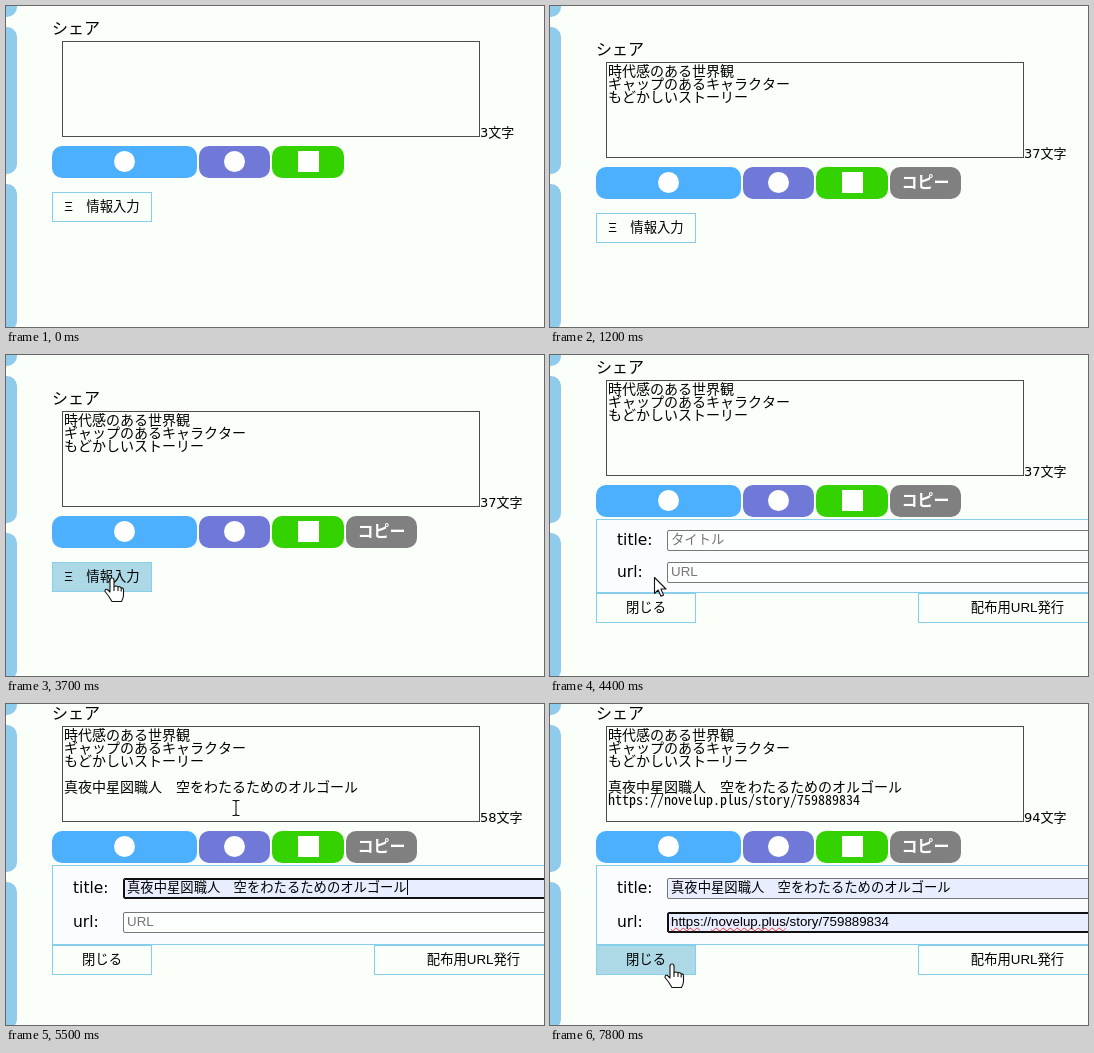
Recreate the animation shown at these times as an HTML page. Size 538 by 321 pixels, loop 8000 ms.

```html
<!DOCTYPE html>
<html lang="ja">
<head>
<meta charset="utf-8">
<title>シェア</title>
<style>
  html, body { margin: 0; width: 100%; height: 100%; overflow: hidden; background: #fafff9; }
  #stage { position: relative; width: 538px; height: 321px; overflow: hidden; background: #fafff9;
    color: #000; font: 13.333px "Liberation Sans", "Noto Sans CJK JP", sans-serif; }
  #stage div, #cursor { position: absolute; box-sizing: border-box; white-space: pre; }
  .bar { left: -20px; width: 31px; height: 147px; border-radius: 10px; background: #91cbec; }
  #flow { left: 0; top: 0; }
  .ui { font-family: "DejaVu Sans", "Noto Sans CJK JP", sans-serif; }
  #heading { left: 46px; top: -24px; font-size: 16px; line-height: 24px; }
  #area { left: 56px; top: 0; width: 418px; height: 96px; padding: 1px 1px; border: 1px solid #4c4c4c;
    font: 14px/13px "Noto Sans Mono CJK JP", "Noto Sans CJK JP", monospace; }
  #count { left: 474px; top: 82px; font-size: 13px; line-height: 20px; }
  .share { top: 105px; width: 71px; height: 32px; border-radius: 10px; }
  .mark { left: 50%; top: 5px; width: 21px; height: 21px; margin-left: -10.5px; background: #fff; }
  .round { border-radius: 50%; }
  #copy { background: #808080; color: #fff; text-align: center;
    font: bold 16px/29px "Noto Sans CJK JP", sans-serif; }
  .btn { width: 100px; height: 30px; border: 1px solid #87ceeb; line-height: 28px; text-align: center; }
  .btn.hover { background: #add8e6; }
  #open { left: 46px; top: 151px; }
  #panel { left: 46px; top: 139px; width: 521px; overflow: hidden;
    border: 1px solid #87ceeb; background: #fafcff; }
  .row { left: 0; width: 521px; height: 21px; }
  .label { left: 20px; top: 0; font-size: 15.5px; line-height: 21px; }
  .field { left: 70px; top: 0; width: 440px; height: 21px; padding-left: 3px; line-height: 18px;
    border: 1px solid #767676; border-radius: 2px; background: #fdfffe; }
  .field.filled { background: #e8edff; }
  .field.focus { border-color: #101010; box-shadow: inset 0 0 0 1px #101010; }
  .field.empty .text { color: #757575; }
  .caret { display: inline-block; width: 1px; height: 15px; margin-right: -1px;
    vertical-align: -3px; background: #000; }
  .typo { text-decoration: underline wavy #e33 1px; text-decoration-skip-ink: none; }
  #cursor { left: 0; top: 0; overflow: visible; }
  #cursor path { stroke: #111; stroke-width: 1.1; fill: #fff; stroke-linejoin: round; }
  #cursor #beam { fill: none; }
</style>
</head>
<body>
<div id="stage">
  <div class="bar" style="top:-136px"></div>
  <div class="bar" style="top:21px"></div>
  <div class="bar" style="top:178px"></div>

  <div id="flow">
    <div id="heading" class="ui">シェア</div>
    <div id="area"></div>
    <div id="count" class="ui"></div>
    <div class="share" style="left:46px;width:145px;background:#4cb0ff"><div class="mark round"></div></div>
    <div class="share" style="left:193px;background:#7078d8"><div class="mark round"></div></div>
    <div class="share" style="left:266px;width:72px;background:#33d200"><div class="mark"></div></div>
    <div class="share" id="copy" style="left:340px">コピー</div>
    <div class="btn" id="open">Ξ　情報入力</div>
    <div id="panel">
      <div class="row" id="titleRow"><div class="label ui">title:</div><div class="field" id="title"></div></div>
      <div class="row" id="urlRow"><div class="label ui">url:</div><div class="field" id="url"></div></div>
    </div>
    <div class="btn" id="close" style="left:46px">閉じる</div>
    <div class="btn" id="issue" style="left:368px;width:199px">配布用URL発行</div>
  </div>

  <svg id="cursor" width="1" height="1">
    <path id="arrow" d="M.5 .5V16.5L4.2 13L7 19.3L9.6 18.1L6.9 12H12Z"/>
    <path id="hand" d="M-2 14V2a2 2 0 0 1 4 0V9q2-2 4 0 2-1 3.2 1 2.3-.5 2.3 2V17q0 3-2 6.500H0Q-3 18-7 13.500q0-3 2.500-2Z M2 9v4M6 9.500v3.500M9.200 10.500v3"/>
    <path id="beam" d="M-3.500-7.500H-1L0-6.500L1-7.500H3.500M0-6.500V6.500M-3.500 7.500H-1L0 6.500L1 7.500H3.500"/>
  </svg>
</div>

<script>
const LOOP = 8000;
const INTRO = "時代感のある世界観\nギャップのあるキャラクター\nもどかしいストーリー";
const TITLE = "真夜中星図職人　空をわたるためのオルゴール";
const URL_TEXT = "https://novelup.plus/story/759889834";
const URL_HTML = URL_TEXT.replace(/https|novelup\.plus/g, '<span class="typo">$&</span>');

// Pointer stops: time, x, y, shape
const stops = [
  [2900, -9, 10, "arrow"], [3200, 62, 42, "arrow"], [3300, 142, 98, "arrow"], [3400, 184, 154, "arrow"],
  [3500, 172, 202, "arrow"], [3600, 128, 220, "hand"], [3700, 106, 223, "hand"], [4300, 104, 222, "arrow"],
  [4700, 116, 216, "arrow"], [4800, 140, 204, "arrow"], [4900, 166, 190, "beam"], [5000, 186, 185, "beam"],
  [5100, 197, 204, "arrow"], [5200, 214, 218, "arrow"], [5500, 230, 104, "beam"],
  [5600, 224, 146, "hand"], [5700, 215, 196, "arrow"], [5800, 205, 218, "beam"], [6300, 215, 71, "beam"],
  [6400, 176, 108, "beam"], [6500, 122, 152, "hand"], [6600, 62, 198, "arrow"], [6700, 24, 234, "arrow"],
  [6800, 8, 258, "arrow"], [6900, 42, 263, "arrow"], [7000, 88, 261, "hand"], [7100, 122, 260, "hand"]
];

const $ = id => document.getElementById(id);
const show = (id, on) => { $(id).style.display = on ? "" : "none"; };
const within = (t, a, b) => t >= a && t < b;

function setHtml(el, html) {
  if (el.shown !== html) el.innerHTML = el.shown = html;
}

function drawField(id, hint, value, focus, caret) {
  const el = $(id);
  el.className = "field" + (value ? " filled" : " empty") + (focus ? " focus" : "");
  const bar = caret ? '<span class="caret"></span>' : "";
  const text = `<span class="text">${value || hint}</span>`;
  setHtml(el, value ? text + bar : bar + text);
}

function drawLayout(t) {
  const open = t < 4300 ? 0 : t < 4400 ? 0.5 : t < 4500 ? 0.92 : 1;
  const y = t < 1200 ? 35 : Math.round(56 - 34 * open);
  const height = Math.round(80 * open);
  const spread = Math.round(5 + 12 * open);
  const middle = height / 2 - 11.5;
  $("flow").style.transform = `translateY(${y}px)`;
  $("panel").style.height = height + "px";
  $("titleRow").style.top = Math.round(middle - spread) + "px";
  $("urlRow").style.top = Math.round(middle + spread) + "px";
  $("close").style.top = $("issue").style.top = 139 + height + "px";
  for (const id of ["panel", "close", "issue"]) show(id, open > 0);
  show("open", !open);
  show("copy", t >= 1200);
  $("open").classList.toggle("hover", t >= 3600);
  $("close").classList.toggle("hover", t >= 7000);
}

function drawText(t) {
  let text = t < 1200 ? "" : INTRO;
  if (t >= 5500) text += "\n\n" + TITLE;
  if (t >= 6200) text += "\n" + URL_TEXT;
  setHtml($("area"), text);
  setHtml($("count"), (t < 1200 ? 3 : t < 5500 ? 37 : t < 6200 ? 58 : 94) + "文字");

  drawField("title", "タイトル", t >= 5300 ? TITLE : "", within(t, 5000, 5800), within(t, 5000, 5800));
  const blink = within(t, 5800, 6300) || within(t, 6400, 6800) || within(t, 7300, 7800);
  drawField("url", "URL", t >= 6000 ? URL_HTML : "", t >= 5800, blink);
}

function drawCursor(t) {
  const stop = stops.filter(s => s[0] <= t).pop();
  show("cursor", stop);
  if (!stop) return;
  const [, x, y, shape] = stop;
  $("cursor").style.transform = `translate(${x}px, ${y}px)`;
  for (const id of ["arrow", "hand", "beam"]) show(id, id === shape);
}

function frame() {
  const t = performance.now() % LOOP;
  drawLayout(t);
  drawText(t);
  drawCursor(t);
  requestAnimationFrame(frame);
}
frame();
</script>
</body>
</html>
```
